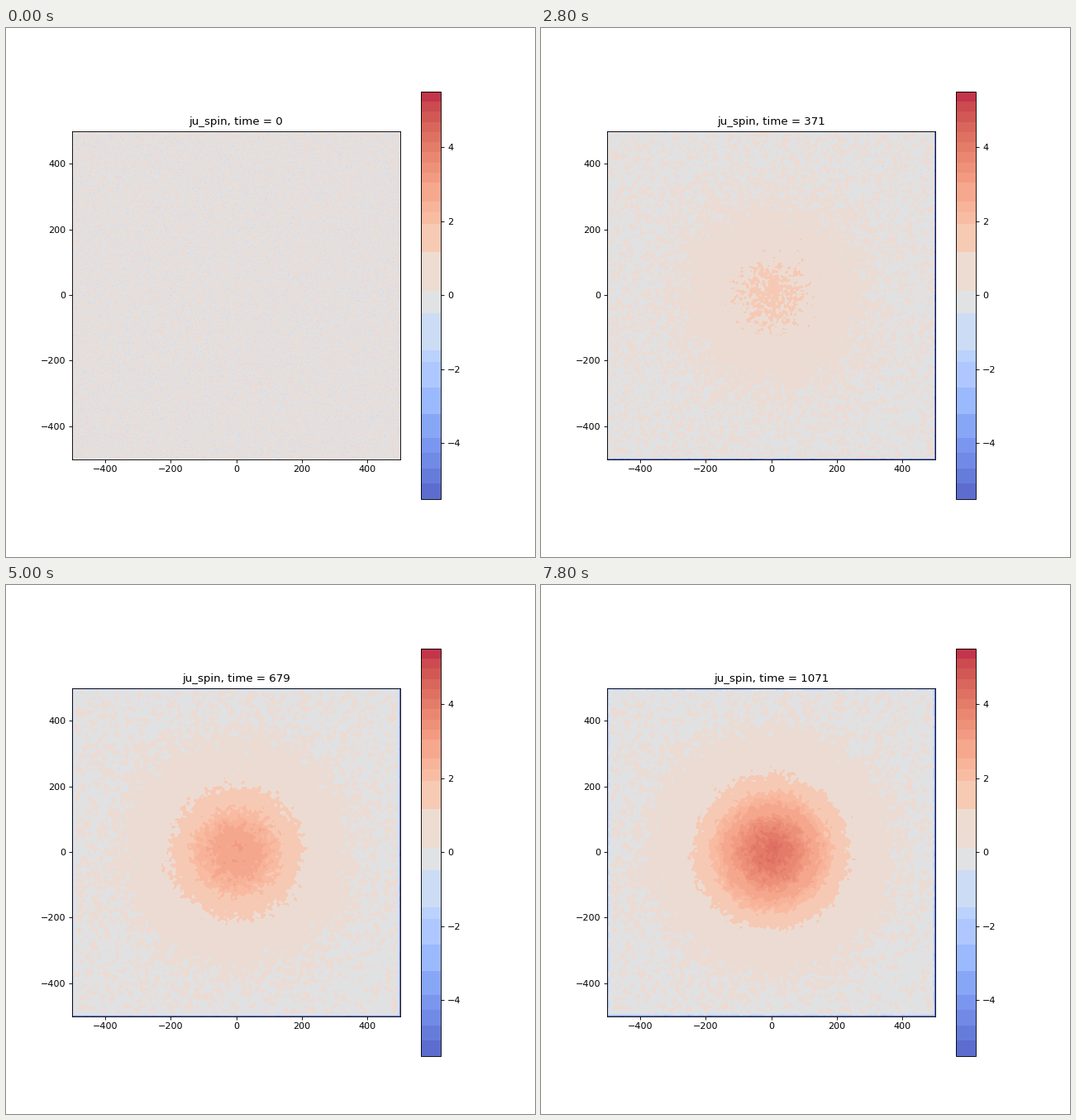
These frames come from a looping animation (640 px wide and 640 px high, 8 s). A matplotlib script:

```python
import numpy as np
import matplotlib.pyplot as plt
from matplotlib.animation import FuncAnimation
from matplotlib.cm import ScalarMappable
from matplotlib.colors import BoundaryNorm, ListedColormap

FRAMES, INTERVAL = 40, 200
LOW, HIGH = -500, 499   # range of the lattice coordinates
N = 397                 # cells per side, one per pixel
SPREAD = 43500          # twice the squared width of the central spot


def make_palette():
    """Uneven colour bands, tinted from coolwarm at 85 % opacity."""
    levels = np.r_[np.linspace(-5.5, -3.85, 5), np.linspace(-3.2, -1.8, 3),
                   -1.5, -0.49, 0.12, 1.17,
                   np.linspace(1.93, 2.53, 3), np.linspace(3.04, 5.5, 10)]
    mids = (levels[:-1] + levels[1:]) / 2
    mids *= np.tanh(2 * np.abs(mids))      # keep the central bands neutral
    colors = 0.85 * plt.get_cmap("coolwarm")(mids / 11 + 0.5)[:, :3] + 0.15
    cmap = ListedColormap(colors)
    return cmap, BoundaryNorm(levels, cmap.N)


rng = np.random.default_rng(7)
spectrum = np.fft.rfft2(rng.standard_normal((N, N)))
freq2 = np.fft.fftfreq(N)[:, None] ** 2 + np.fft.rfftfreq(N) ** 2

axis = np.linspace(LOW, HIGH, N)
bell = np.exp(-(axis[:, None] ** 2 + axis ** 2) / SPREAD)

steps = np.arange(N)
inset = np.minimum(steps, steps[::-1])
border = np.minimum(inset[:, None], inset)  # cells to the nearest edge


def grain(sigma):
    """Unit-variance noise, smoothed by a Gaussian of the given width."""
    g = np.fft.irfft2(spectrum * np.exp(-2 * (np.pi * sigma) ** 2 * freq2),
                      s=(N, N))
    return g / g.std()


def field(t):
    peak = 4.5 * np.tanh((t / 811) ** 1.6)
    noise = 0.10 + 0.23 * np.exp(-t / 280)
    blur = 1.6 * np.tanh(t / 400)
    edge = 5 * (1 - np.exp(-(t / 250) ** 4))
    rim = np.exp(-border * 1200 / (t + 1))
    return 0.05 + peak * bell + noise * grain(blur) - edge * rim


cmap, norm = make_palette()
fig, ax = plt.subplots(figsize=(8, 8), dpi=80)
image = ax.imshow(field(0), cmap=cmap, norm=norm, interpolation="nearest",
                  origin="lower", extent=(LOW, HIGH, LOW, HIGH))
ax.set_xticks(range(-400, 401, 200))
ax.set_yticks(range(-400, 401, 200))
title = ax.set_title("", pad=6.6)
bar = fig.colorbar(ScalarMappable(norm, cmap), ax=ax, spacing="proportional",
                   ticks=range(-4, 5, 2))
bar.minorticks_off()


def update(i):
    t = max(0, 28 * i - 21)
    image.set_data(field(t))
    title.set_text(f"ju_spin, time = {t}")
    return image, title


anim = FuncAnimation(fig, update, frames=FRAMES, interval=INTERVAL,
                     repeat=True, repeat_delay=0, blit=False)
plt.show()
```
